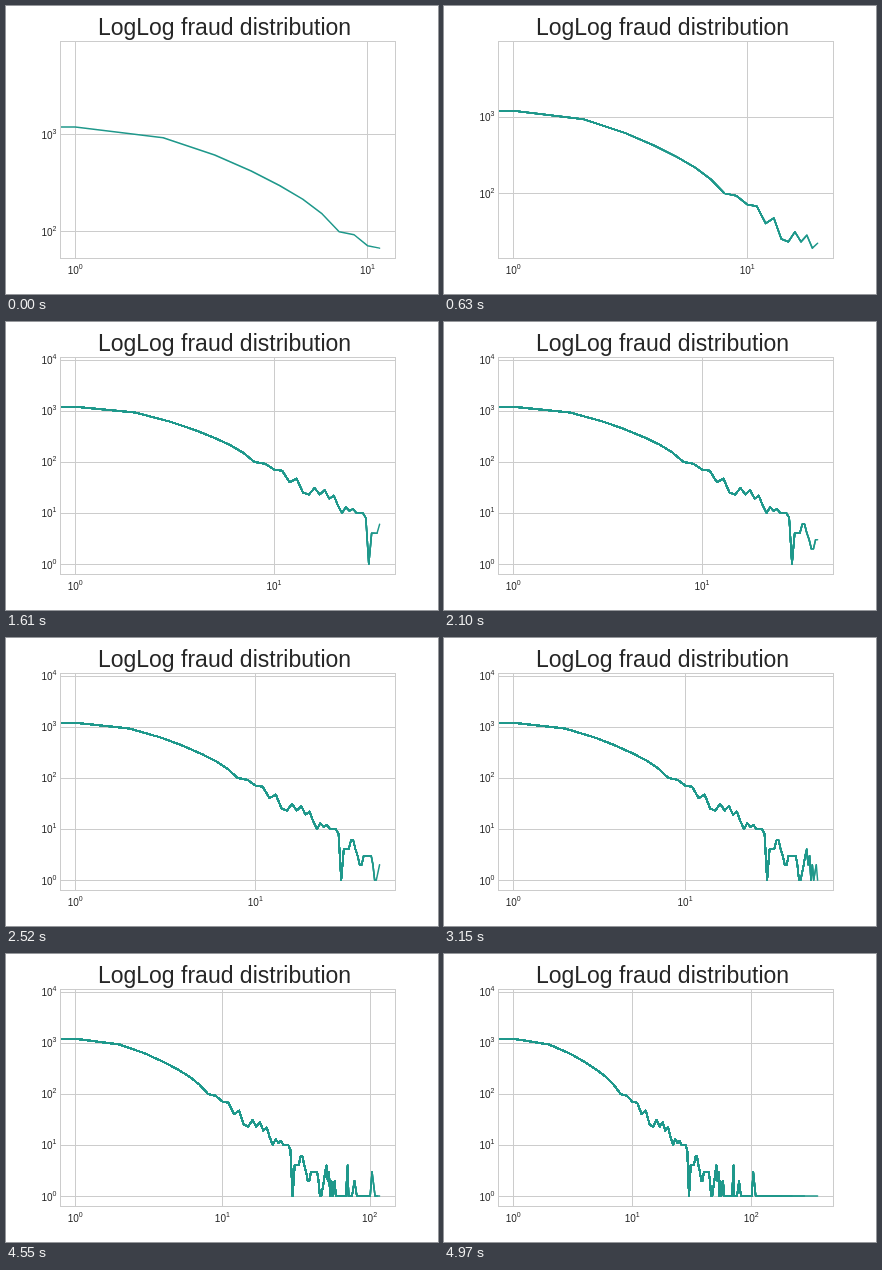
Write an HTML page that moves like this. It is 432 px wide and 288 px high and loops after 5740 ms.

```html
<!DOCTYPE html>
<html lang="en">
<head>
<meta charset="utf-8">
<title>LogLog fraud distribution</title>
<style>
  html, body { margin: 0; width: 100%; height: 100%; overflow: hidden; background: #fff; }
  svg { display: block; width: 432px; height: 288px; }
  text { font-family: "Liberation Sans", Arial, sans-serif; font-size: 10px; fill: #262626; }
  .title { font-size: 23px; text-anchor: middle; }
  .rule { fill: none; stroke: #ccc; stroke-width: 1; }
  .curve { fill: none; stroke: #1f988b; stroke-width: 1.5; stroke-linejoin: round; stroke-linecap: round; }
</style>
</head>
<body>
<svg viewBox="0 0 432 288">
  <clipPath id="area"><rect x="54" y="34.56" width="334.8" height="217.44"/></clipPath>
  <g id="grid"></g>
  <g id="curves" clip-path="url(#area)"></g>
  <rect class="rule" x="54.5" y="35.5" width="335" height="217"/>
  <g id="labels"></g>
  <text class="title" x="218.5" y="29">LogLog fraud distribution</text>
</svg>
<script>
const STEP = 70, LAST = 71, LOOP = 5740, FIRST_COUNT = 11;
const BOX = { left: 54, right: 388.8, top: 34.56, bottom: 252 };
const MARGIN = 1 / 22;
const PEAK = 7360; // value at x = 0, off the log axis but part of the y range

// Frequencies for x = 1, 2, 3, ...; 0 marks a missing x
const head = [1195, 925, 613, 419, 297, 215, 151, 99, 92, 71, 67,
  40, 47, 25, 23, 31, 23, 28, 19, 22, 14, 10, 13, 11, 12, 10, 10, 10, 8, 1,
  4, 4, 4, 6, 6, 4, 3, 2, 2, 3, 3, 0, 3, 3, 2, 1, 1, 0, 2,
  3, 4, 2, 3, 1, 2, 1, 0, 2, 1];
const tail = [61, 63, 64, 66, 67, 69, 71, 72, 74, 76, 79, 82, 86, 92, 97,
  101, 104, 109, 113, 117, 130, 150, 180, 220, 280, 361];
const bumps = { 71: 4, 79: 2, 104: 3 };
const points = head.map((y, i) => [i + 1, y]).filter(p => p[1])
  .concat(tail.map(x => [x, bumps[x] || 1]));

const byId = id => document.getElementById(id);
const snap = v => Math.floor(v + 0.5) + 0.5;
const gridLine = d => `<path class="rule" d="${d}"/>`;
const powerLabel = (x, y, anchor, power) =>
  `<text x="${x.toFixed(2)}" y="${y}" text-anchor="${anchor}">10<tspan dy="-5.5" font-size="7">${power}</tspan></text>`;

const curves = Array.from({ length: LAST + 1 }, () => {
  const path = document.createElementNS("http://www.w3.org/2000/svg", "path");
  path.setAttribute("class", "curve");
  return byId("curves").appendChild(path);
});

function draw(step) {
  const shown = points.slice(0, FIRST_COUNT + step);
  const padX = (BOX.right - BOX.left) * MARGIN;
  const padY = (BOX.bottom - BOX.top) * MARGIN;
  const low = Math.log10(Math.min(...shown.map(p => p[1])));
  const decadeX = (BOX.right - BOX.left - 2 * padX) / Math.log10(shown[shown.length - 1][0]);
  const decadeY = (BOX.bottom - BOX.top - 2 * padY) / (Math.log10(PEAK) - low);
  const toX = power => BOX.left + padX + power * decadeX;
  const toY = power => BOX.bottom - padY - (power - low) * decadeY;

  let grid = "", labels = "";
  for (let power = 0; power <= 4; power++) {
    const x = toX(power), y = toY(power);
    if (x <= BOX.right) {
      grid += gridLine(`M${snap(x)} 35V252`);
      labels += powerLabel(x, 268, "middle", power);
    }
    if (y >= BOX.top && y <= BOX.bottom) {
      grid += gridLine(`M54 ${snap(y)}H389`);
      labels += powerLabel(50.5, Math.round(y + 4.5), "end", power);
    }
  }
  byId("grid").innerHTML = grid;
  byId("labels").innerHTML = labels;

  // Each step plots a longer curve over the earlier ones
  const coords = shown.map(([x, y]) =>
    `${toX(Math.log10(x)).toFixed(2)} ${toY(Math.log10(y)).toFixed(2)}`);
  const start = `M0 ${toY(Math.log10(points[0][1])).toFixed(2)}L`;
  curves.forEach((path, i) => path.setAttribute("d",
    i <= step ? start + coords.slice(0, FIRST_COUNT + i).join("L") : ""));
}

const origin = performance.now();
let current = -1;
function tick() {
  const time = (performance.now() - origin) % LOOP;
  const step = Math.min(LAST, Math.floor(time / STEP));
  if (step !== current) draw(current = step);
  requestAnimationFrame(tick);
}
tick();
</script>
</body>
</html>
```
